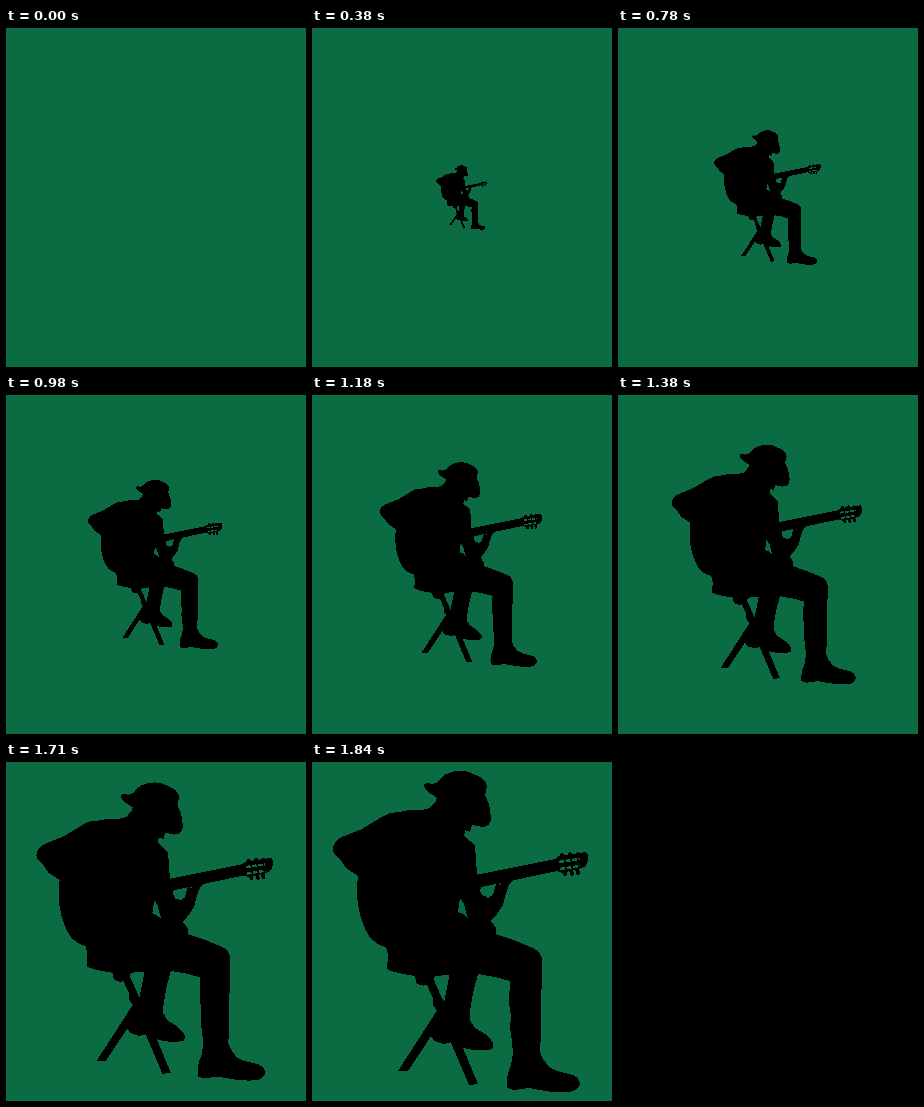
Write an HTML page that moves like this. It is 300x339 px and loops after 2.74 s.

```html
<!DOCTYPE html>
<html lang="en">
<head>
<meta charset="utf-8">
<title>Guitarist</title>
<style>
  html, body { margin: 0; width: 100%; height: 100%; overflow: hidden; background: #0b6c43; }
  svg { display: block; width: 100vw; height: 100vh; }
  .gap { fill: #0b6c43; }
  .line { fill: none; stroke: #000; }
</style>
</head>
<body>
<svg viewBox="0 0 300 339" shape-rendering="crispEdges">
  <g id="player">
    <!-- hat and head -->
    <path d="M112 23Q113 20 120 22L126 20Q130 13 137 11Q147 7 157 10L168 15Q174 19 175 24L173 33L177 42L179 55Q179 65 170 65L160 63L158 70L153 68L152 76L118 60L121 46L125 36L121 33Q113 29 112 23Z"/>
    <!-- back, arm, guitar body and seat -->
    <path d="M124 39L118 46L110 48L97 48L88 50L78 51L70 55L60 61L50 67L30 75Q21 79 21 88Q22 93 28 97L34 106L46 114Q44 128 46 143Q49 161 57 174Q64 183 74 185L76 193L75 207Q82 211 103 214L104 220Q108 225 115 223L121 219L123 214L136 213L170 212L184 175L184 166L180 160L166 156L160 150L165 112L163 84L158 79L152 74L153 60Z"/>
    <!-- fretting arm -->
    <path d="M147 130L164 122L169 124L170 132L176 136L181 133L184 122L202 117L197 123L194 131L191 143L185 152L179 159L185 174L145 180Z"/>
    <!-- far leg and boot -->
    <path d="M138 211L132 241L129 250L121 263L118 272L122 279L132 282L140 280L148 285L156 287Q170 290 180 287Q183 282 179 278L173 272L162 265L158 258L158 249L161 231L166 212L150 190Z"/>
    <!-- near leg and boot -->
    <path d="M160 211L183 215L198 219L197 240L199 255L198 265L200 280L201 291L199 303L196 311Q194 319 195 326L202 328L217 326L228 328Q242 331 257 330Q266 329 268 322Q267 316 261 313L245 309L237 305L231 297L228 290L229 270L229 245L230 210L230 197Q229 190 221 186L204 179L184 172L160 180Z"/>
    <!-- stool -->
    <path d="M113 219L121 216L134 245L166 322L157 323L126 250L121 243L121 236Z"/>
    <path d="M126 247L135 250L96 309L86 309Z"/>
    <!-- guitar neck and head -->
    <path d="M158 114L243 97L247 94L268 91L274 90Q277 93 276 98Q275 104 270 106L250 111L245 109L160 127Z"/>
    <path class="line" stroke-width="4" stroke-linecap="round" d="M250 93l1 3M258 92l1 3M266 92l1 3M252 109l1 3M259 108l1 4M265 107l1 4"/>
    <!-- openings -->
    <path class="gap" d="M148 136L152 142L154 150L156 156L151 152L146 150Z"/>
    <path class="gap" d="M169 126L182 123L181 130L176 135L171 134L168 129Z"/>
    <path class="gap" d="M187 122L189 121L188 124Z"/>
    <path stroke="#0b6c43" stroke-width="2.6" stroke-dasharray="5 1.6" d="M247 100L268 97M248 107L268 104"/>
  </g>
</svg>
<script>
const LOOP = 2740, FIRST = 50, STEPS = 55, RATE = 0.03;
const player = document.getElementById('player');

// The figure grows from the stage centre in even steps, then holds.
function render(t) {
  const step = t < FIRST ? 0 : Math.min(STEPS, Math.floor((t - 6) * RATE));
  player.setAttribute('transform',
    `translate(150 169.5) scale(${step / STEPS}) translate(-150 -169.5)`);
  player.style.visibility = step ? 'visible' : 'hidden';
}

const start = performance.now();
function tick() {
  render((performance.now() - start) % LOOP);
  requestAnimationFrame(tick);
}
tick();
</script>
</body>
</html>
```
